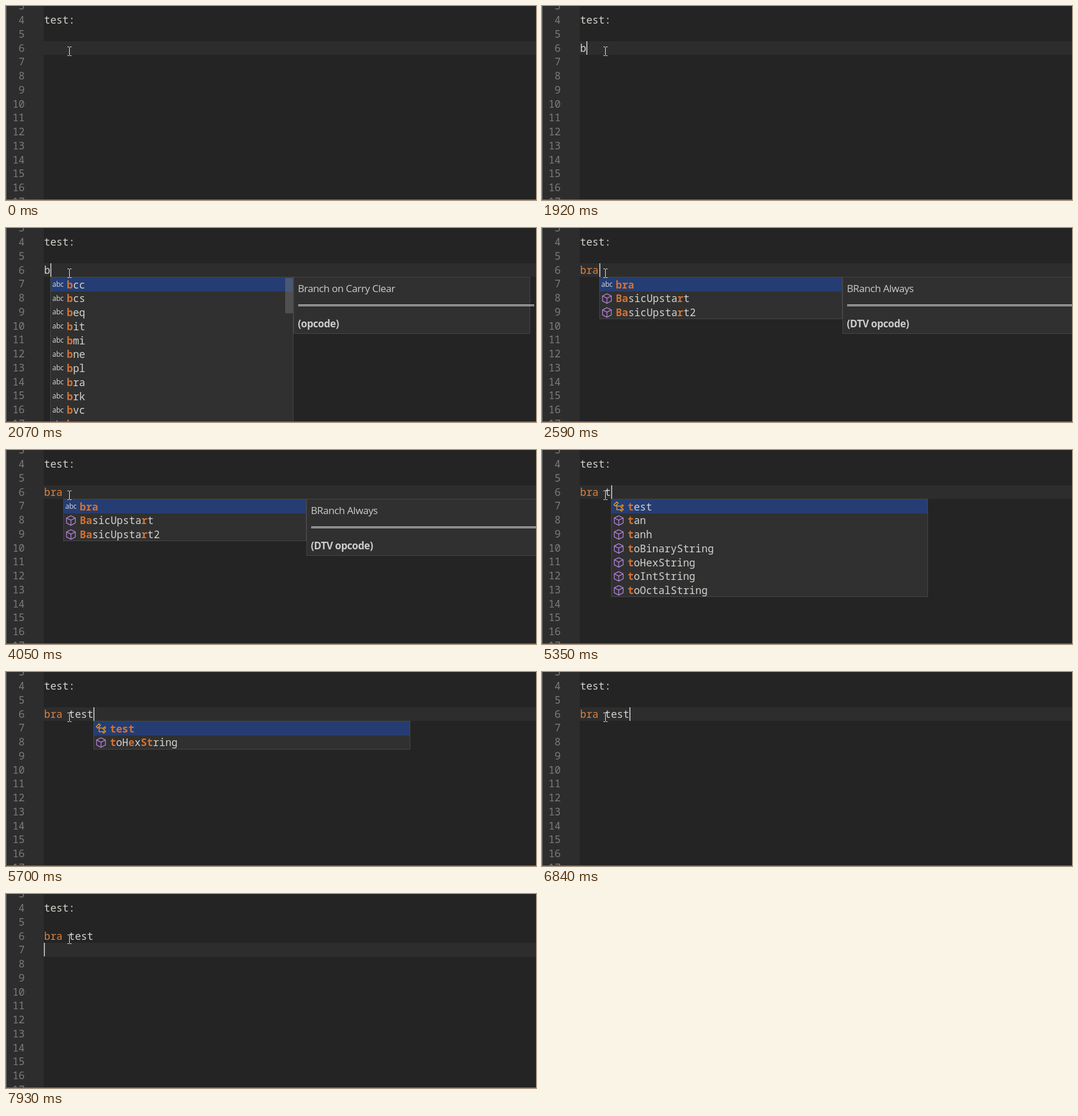
An HTML page that plays this animation: 898x330 px, repeating every 8000 ms.

```html
<!DOCTYPE html>
<html lang="en">
<head>
<meta charset="utf-8">
<title>Code completion</title>
<style>
  html, body { margin: 0; width: 100%; height: 100%; overflow: hidden; background: #242424; }
  svg { display: block; width: 898px; height: 330px; }
  text { font: 17.4px "Noto Sans Mono", "DejaVu Sans Mono", monospace; fill: #d2d2cc; white-space: pre; }
  .num { fill: #7b7b7b; text-anchor: end; }
  .op { fill: #d9803f; }
  .hit { fill: #d5722f; font-weight: 700; }
  .doc { font: 17px "Open Sans", "Noto Sans", sans-serif; letter-spacing: -.42px; fill: #cccccc; }
  .doc.bold { font-weight: 700; }
  .abc { font: 12px "Open Sans", sans-serif; letter-spacing: -.3px; fill: #d8d8d8; text-anchor: middle; }
  .box { fill: #303031; stroke: #464646; }
  .cube, .cls { fill: none; stroke: #b180d7; stroke-width: 1.05; stroke-linejoin: round; }
  .cls { stroke: #ee9d28; }
</style>
</head>
<body>
<svg viewBox="0 0 898 330">
  <rect width="898" height="330" fill="#242424"/>
  <rect width="64" height="330" fill="#2d2d2d"/>
  <rect id="line" x="64" y="60" width="834" height="23" fill="#2d2d2d"/>
  <g id="nums"></g>
  <text x="64.5" y="30">test:</text>
  <text id="code" x="64.5" y="77.5"></text>
  <rect id="caret" width="2" height="23" fill="#aeafad"/>
  <g id="popup"></g>
  <path d="M104 69.5h2.5l1 1 1-1h2.5M107.5 70.5v13M104 84.5h2.5l1-1 1 1h2.5" fill="none" stroke="#e6e6e6"/>
  <path d="M.5 0V329.5H898" fill="none" stroke="#707070"/>
</svg>
<script>
const $ = id => document.getElementById(id);
const LOOP = 8000, ROW = 23.75;
const caretX = [64, 75, 86, 97, 107, 117, 127, 138, 148];

// Items: icon letter (k keyword, m function, c constant), then label with [matched] letters.
const lists = {
  b: { rows: ['k[b]cc', 'k[b]cs', 'k[b]eq', 'k[b]it', 'k[b]mi', 'k[b]ne', 'k[b]pl', 'k[b]ra', 'k[b]rk', 'k[b]vc', 'k[b]vs'],
       bar: 60, doc: ['Branch on Carry Clear'], kind: '(opcode)' },
  br: { rows: ['k[br]a', 'k[br]k', 'm[B]asicUpsta[r]t', 'm[B]asicUpsta[r]t2'], doc: ['BRanch Always'], kind: '(DTV opcode)' },
  bra: { rows: ['k[bra]', 'm[Ba]sicUpsta[r]t', 'm[Ba]sicUpsta[r]t2'], doc: ['BRanch Always'], kind: '(DTV opcode)' },
  all: { rows: ['mabs', 'macos', 'masin', 'cAT_ABSOLUTE', 'cAT_ABSOLUTEX', 'cAT_ABSOLUTEY', 'cAT_IMMEDIATE',
                'cAT_INDIRECT', 'cAT_IZEROPAGEX', 'cAT_IZEROPAGEY', 'cAT_NONE'], bar: 38,
         doc: ['Returns the absolute (positive) value of X. For', 'example, the absolute value of -2 is 2.'], kind: '(65c02 opcode)' },
  t: { rows: ['c[t]est', 'm[t]an', 'm[t]anh', 'm[t]oBinaryString', 'm[t]oHexString', 'm[t]oIntString', 'm[t]oOctalString'], wide: 537 },
  te: { rows: ['c[te]st', 'm[t]oH[e]xString', 'cAT_ABSOLU[TE]'], wide: 537 },
  tes: { rows: ['c[tes]t', 'm[t]oH[e]x[S]tring'], wide: 537 },
  test: { rows: ['c[test]', 'm[t]oH[e]x[St]ring'], wide: 537 }
};

// time, typed text, caret shown, list, documentation hidden, caret on next line
const steps = [
  [0, '', 0], [430, '', 1], [960, '', 0], [1490, '', 1],
  [1920, 'b', 1], [1980, 'b', 1, 'b', 1], [2070, 'b', 1, 'b'],
  [2250, 'br', 1, 'br'], [2590, 'bra', 1, 'bra'],
  [3050, 'bra', 0, 'bra'], [3510, 'bra', 1, 'bra'], [4050, 'bra', 0, 'bra'],
  [4510, 'bra ', 1], [4570, 'bra ', 1, 'all'], [5030, 'bra ', 0, 'all'],
  [5350, 'bra t', 1, 't'], [5430, 'bra te', 1, 'te'], [5610, 'bra tes', 1, 'tes'], [5700, 'bra test', 1, 'test'],
  [6220, 'bra test', 0, 'test'], [6660, 'bra test', 1, 'test'], [6840, 'bra test', 1],
  [7220, 'bra test', 0], [7650, 'bra test', 1], [7930, 'bra test', 1, '', 0, 1]
];

const icons = {
  k: '<text class="abc" y="3.5">abc</text>',
  m: '<path class="cube" transform="scale(1.25)" d="M0-6.5 6-3.5V3.3L0 6.5-6 3.3V-3.5ZM-6-3.5 0-.5 6-3.5M0-.5V6.5"/>',
  c: '<path class="cls" transform="scale(1.25) translate(-8 -8)" d="M1.5 5.3 5.3 1.5 7.3 3.5 3.5 7.3ZM5.4 5.5V12.3H10.4M5.4 7.3H10.4' +
     'M10.4 8 13 5.4 14.3 6.7 11.7 9.3ZM10.4 13 13 10.4 14.3 11.7 11.7 14.3Z"/>'
};
const rect = (x, y, w, h, attr) => `<rect x="${x}" y="${y}" width="${w}" height="${h}" ${attr}/>`;
const mark = s => s.replace(/\[/g, '<tspan class="hit">').replace(/]/g, '</tspan>');

function docPanel(x, { doc, kind }) {
  const extra = (doc.length - 1) * ROW, rule = Math.floor(130 + extra);
  return rect(x + .5, 83.5, 400, Math.floor(96 + extra), 'class="box"') +
    doc.map((s, i) => `<text class="doc" x="${x + 7.5}" y="${109 + i * ROW}">${s}</text>`).join('') +
    rect(x + 8, rule, 400, 1, 'fill="#e4e4e4"') + rect(x + 8, rule + 2, 400, 1, 'fill="#e4e4e4"') +
    `<text class="doc bold" x="${x + 7.5}" y="${169 + extra}">${kind}</text>`;
}

function popup(x, list, noDoc) {
  const w = list.wide || 412, h = Math.round(list.rows.length * ROW);
  let out = rect(x + .5, 83.5, w - 1, h, 'class="box"') + rect(x + 1, 84, w - 2, 24, 'fill="#253d72"');
  list.rows.forEach((s, i) => {
    const y = 96.3 + i * ROW;
    out += `<g transform="translate(${x + 13} ${y})">${icons[s[0]]}</g>` +
      `<text x="${x + 28}" y="${y + 6.2}">${mark(s.slice(1))}</text>`;
  });
  if (list.bar) out += rect(x + w - 14, 85, 13, list.bar, 'fill="#797979" fill-opacity=".45"');
  if (list.doc && !noDoc) out += docPanel(x + w, list);
  return out;
}

for (let n = 3; n < 18; n++)
  $('nums').innerHTML += `<text class="num" x="31.8" y="${30 + (n - 4) * ROW}">${n}</text>`;

let shown = -1;
function draw(now) {
  const t = now % LOOP;
  const at = steps.findLastIndex(s => s[0] <= t);
  if (at !== shown) {
    shown = at;
    const [, text, caret, list, noDoc, below] = steps[at];
    const x = caretX[below ? 0 : text.length];
    $('code').innerHTML = text.startsWith('bra') ? '<tspan class="op">bra</tspan>' + text.slice(3) : text;
    $('caret').setAttribute('x', x);
    $('caret').setAttribute('y', below ? 83 : 60);
    $('caret').setAttribute('visibility', caret ? 'visible' : 'hidden');
    $('line').setAttribute('y', below ? 83 : 60);
    $('line').setAttribute('height', below ? 24 : 23);
    $('popup').innerHTML = list ? popup(x, lists[list], noDoc) : '';
  }
  requestAnimationFrame(draw);
}
const start = performance.now();
(function tick() { draw(0); })();
</script>
</body>
</html>
```
